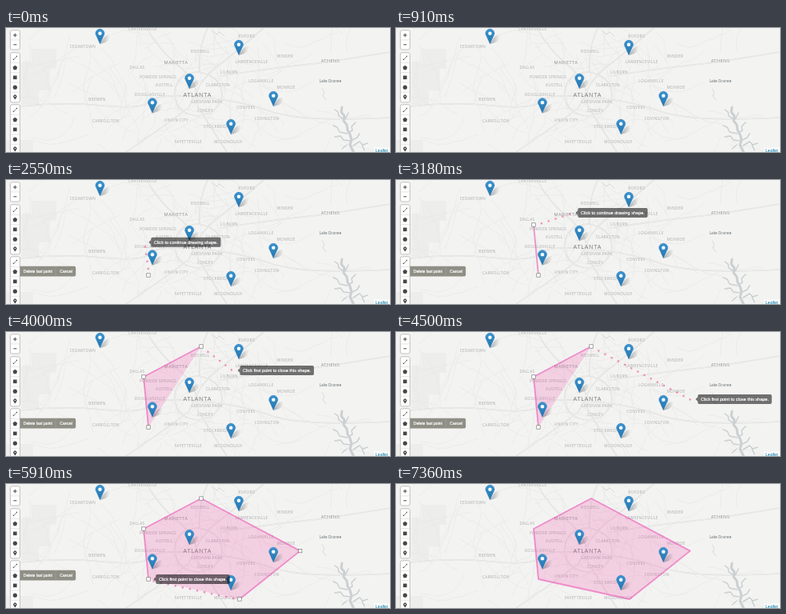
An HTML page that plays this animation: 480x155 px, repeating every 7.4 s.

```html
<!DOCTYPE html>
<html lang="en">
<head>
<meta charset="utf-8">
<title>Drawing a shape on a map</title>
<style>
  html, body { margin: 0; width: 100%; height: 100%; overflow: hidden; background: #f3f3f2; }
  svg { display: block; width: 480px; height: 155px; }
  text { font-family: "Liberation Sans", Arial, sans-serif; }
  #labels text { font-family: "Open Sans", sans-serif; text-anchor: middle; }
  #actions text, #tipText { fill: #fff; stroke: #fff; stroke-width: .2px; }
</style>
</head>
<body>
<svg id="stage" viewBox="0 0 480 155">
  <defs>
    <linearGradient id="pinFill" x1="0" y1="0" x2="0" y2="1">
      <stop offset="0" stop-color="#3a94d2"/><stop offset="1" stop-color="#2374ad"/>
    </linearGradient>
    <linearGradient id="shade"><stop offset="0" stop-opacity=".3"/><stop offset="1" stop-opacity="0"/></linearGradient>
    <g id="pin">
      <path d="M0 0L5 -8Q10 -13 12.5 -10Q13 -6 7 -2Z" fill="url(#shade)"/>
      <g transform="translate(-5.8 -19) scale(.4625)">
        <path d="M12.5 .5C5.9 .5 .5 6 .5 12.4c0 3 2 6 3.5 9L12.5 40.5 21 21.4c1.5-3 3.5-6 3.5-9C24.5 6 19 .5 12.5 .5z" fill="url(#pinFill)" stroke="#2f78b0"/>
        <circle cx="12.5" cy="12.5" r="4.8" fill="#fff"/>
      </g>
    </g>
  </defs>
  <rect width="480" height="155" fill="#f3f3f2"/>
  <path d="M19 42h13v-16h31v25h-8v27h-14v18h-22zM0 140h34v15h-34z" fill="#ededec"/>
  <g id="minor" fill="none" stroke="#e6e6e5" stroke-width=".6"></g>
  <g id="major" fill="none" stroke-linejoin="round"></g>
  <g fill="none" stroke="#cbd0d2" stroke-linejoin="round" stroke-linecap="round">
    <path d="M420 99l-1 6 4 5 -1 6 4 5 1 7 3 5 2 7 -2 6 4 8" stroke-width="3"/>
    <path d="M411 102l4 3 1 5 6 4M428 106l-4 8M409 122l5 2 3 6 9 2M437 118l-5 5 1 5 -5 3M411 136l7 -1 4 5 8 1M433 140l6 -3 3 -5M434 147l8 -5 4 4 6 -2M445 146l3 7M420 151l6 -5" stroke-width="1.5"/>
    <path d="M395 76l3 4 -2 5 4 5M258 4l5 4 4 -3 6 5" stroke-width=".7"/>
  </g>
  <g id="labels"></g>
  <path id="area" fill="#f050a8" fill-opacity=".22"/>
  <path id="outline" fill="none" stroke="#ec55b4" stroke-opacity=".6" stroke-width="1.85" stroke-linejoin="round" stroke-linecap="round"/>
  <g id="pins"></g>
  <g id="dashes" fill="#f357a1" fill-opacity=".65"></g>
  <g id="handles" fill="#fff" stroke="#666" stroke-width=".6"></g>
  <g id="bars"></g>
  <g id="actions" font-size="5.05">
    <path d="M17.4 107.7h67.8q2 0 2 2v8.7q0 2 -2 2h-67.8z" fill="#8f8f86"/>
    <path d="M62.2 107.7v12.7" stroke="#aaa" stroke-width=".5"/>
    <text x="21.8" y="115.8">Delete last point</text>
    <text x="67.3" y="115.8">Cancel</text>
  </g>
  <rect x="460" y="149.4" width="20" height="6" fill="#fff" fill-opacity=".7"/>
  <text x="462" y="155.2" font-size="5.1" fill="#0078a8">Leaflet</text>
  <g id="tip">
    <path d="M-2.8 0L0 -2.8V2.8Z" fill="#000" fill-opacity=".55"/>
    <rect id="tipBox" y="-6" height="12" rx="1.9" fill="#000" fill-opacity=".54"/>
    <text id="tipText" x="3.7" y="1.9" font-size="5.55"></text>
  </g>
</svg>
<script>
const LOOP = 7400;
const $ = id => document.getElementById(id);

function add(parent, tag, attrs, text) {
  const node = document.createElementNS("http://www.w3.org/2000/svg", tag);
  for (const key in attrs) node.setAttribute(key, attrs[key]);
  if (text) node.textContent = text;
  return parent.appendChild(node);
}

let seed = 11;
const random = () => (seed = (seed * 16807) % 2147483647) / 2147483647;

// Local roads: short wandering lines, denser around the city
for (let i = 0; i < 130; i++) {
  const inner = i < 70;
  let x = inner ? 150 + random() * 180 : random() * 480;
  let y = random() * 155;
  let angle = random() * Math.PI * 2;
  let d = `M${x} ${y}`;
  for (let step = 0; step < 7; step++) {
    angle += (random() - .5) * .8;
    x += Math.cos(angle) * (inner ? 6 : 10);
    y += Math.sin(angle) * (inner ? 6 : 10);
    d += `L${x.toFixed(1)} ${y.toFixed(1)}`;
  }
  add($("minor"), "path", { d });
}

const highways = [
  "M176 0Q192 28 212 44T237 76L240 98Q256 124 276 155",
  "M322 0Q290 28 268 45T240 76L228 100Q196 124 150 155",
  "M18 98Q70 92 120 97T180 92T238 86Q290 90 330 104T480 112",
  "M211 82Q211 57 240 55Q270 60 270 84Q266 108 240 110Q212 108 211 82Z",
  "M242 55Q240 26 252 0", "M268 60Q330 50 400 43L480 30"
];
for (const [stroke, width] of [["#d9d9d8", 1.5], ["#f5f5f4", .7]])
  for (const d of highways) add($("major"), "path", { d, stroke, "stroke-width": width });

const towns = `CEDARTOWN 96 23|CARTERSVILLE 171 1|BUFORD 301 10|ROSWELL 243 29|LAWRENCEVILLE 307 42
WINDER 349 35|DALLAS 164 49|POWDER SPRINGS 190 61|AUSTELL 198 71|LILBURN 279 55|CLARKSTON 265 71
LOGANVILLE 319 66|MONROE 350 74|DOUGLASVILLE 180 83|GRESHAM PARK 251 92|BREMEN 114 89|CONLEY 249 103
CONYERS 300 99|CARROLLTON 125 116|UNION CITY 213 115|COVINGTON 326 113|STOCKBRIDGE 265 123
FAYETTEVILLE 228 142|MCDONOUGH 278 142`;
function label(name, x, y, size, fill, spacing) {
  add($("labels"), "text", { x, y: +y + size * .36, "font-size": size, fill, "letter-spacing": spacing,
    stroke: "#f3f3f2", "stroke-width": .6, "paint-order": "stroke" }, name);
}
for (const town of towns.split(/[|\n]/)) {
  const [, name, x, y] = town.match(/(.+) (\d+) (\d+)/);
  label(name, x, y, 4.7, "#a8a9aa", .42);
}
label("MARIETTA", 212.5, 42.5, 5.6, "#8c8d8e", .45);
label("ATHENS", 405.5, 41, 5.6, "#8c8f92", .45);
label("ATLANTA", 239.3, 83, 7.3, "#747576", .75);
label("Lake Oconee", 405.5, 66.5, 4.6, "#5f676b", 0);

for (const [x, y] of [[117.5, 20], [291, 34], [229.3, 76], [183, 106.4], [334.3, 98], [281.2, 133]])
  add($("pins"), "use", { href: "#pin", x, y });

const PITCH = 12.3;
const icons = [
  "M-2.6 1.6h1.2L1.5 -1.3V-2.5H2.7V-1.3H2.1L-1.2 2V2.8H-2.6Z",
  "M0 -2.8L2.8 -.7 1.8 2.6H-1.8L-2.8 -.7Z",
  "M-2.3 -2.3H2.3V2.3H-2.3Z",
  "M-2.6 0a2.6 2.6 0 1 0 5.2 0a2.6 2.6 0 1 0 -5.2 0Z",
  "M0 3.1L-1.9 .3A2.2 2.2 0 1 1 1.9 .3ZM-.8 -.9a.8 .8 0 1 0 1.6 0a.8 .8 0 1 0 -1.6 0Z"
];
const zoomIcons = ["M-2.3 -.5H-.5V-2.3H.5V-.5H2.3V.5H.5V2.3H-.5V.5H-2.3Z", "M-2 -.5H2V.5H-2Z"];
function toolbar(top, paths, pitch) {
  add($("bars"), "rect", { x: 5.4, y: top, width: 12, height: paths.length * pitch + .6, rx: 2,
    fill: "#fff", stroke: "#b9b9b8", "stroke-width": .9 });
  paths.forEach((d, i) => {
    const y = top + .3 + pitch * (i + .5);
    if (i) add($("bars"), "path", { d: `M5.9 ${y - pitch / 2}h11`, stroke: "#ccc", "stroke-width": .5 });
    add($("bars"), "path", { d, transform: `translate(11.3 ${y})`, fill: "#464646", "fill-rule": "evenodd" });
  });
}
toolbar(2.8, zoomIcons, 11.8);
toolbar(30.8, icons, PITCH);
toolbar(95.8, icons, PITCH);

// Pointer waypoints: time, x, y
const pointer = [
  [1480, 11, 113], [1680, 134.8, 110], [1950, 178, 119],
  [2330, 178, 119], [2550, 172, 78], [2720, 172, 56],
  [2960, 172, 56], [3180, 218, 41], [3420, 244, 18],
  [3810, 244, 18], [4000, 283, 48], [4450, 368, 84],
  [4760, 368, 84], [4980, 292, 144],
  [5450, 292, 144], [5850, 178, 119]
];
const corners = [[178, 119], [172, 56], [244, 18], [367.7, 83.6], [292, 144]];
const clicks = [2240, 2840, 3770, 4730, 5300];
const ACTIVATE = 1250, TIP_START = 1500, FINISH = 6000;
const DASH_GAP = 9.25;

const handles = corners.map(([x, y]) =>
  add($("handles"), "rect", { x: x - 2.2, y: y - 2.2, width: 4.4, height: 4.4 }));
const dashes = Array.from({ length: 20 }, () => add($("dashes"), "rect", { width: 2.3, height: 2.3 }));
const show = (node, on) => node.setAttribute("visibility", on ? "visible" : "hidden");

function pointerAt(t) {
  const next = pointer.findIndex(p => p[0] > t);
  if (next < 0) return pointer[pointer.length - 1].slice(1);
  if (next === 0) return pointer[0].slice(1);
  const [a, b] = [pointer[next - 1], pointer[next]];
  const k = (t - a[0]) / (b[0] - a[0]);
  return [a[1] + (b[1] - a[1]) * k, a[2] + (b[2] - a[2]) * k];
}

function hint(count) {
  if (!count) return "Click to start drawing shape.";
  return count < 3 ? "Click to continue drawing shape." : "Click first point to close this shape.";
}

function render(t) {
  const done = t >= FINISH;
  const count = clicks.filter(c => t >= c).length;
  const [x, y] = pointerAt(t);

  const line = count ? "M" + corners.slice(0, count).join("L") : "";
  $("area").setAttribute("d", line);
  $("outline").setAttribute("d", line + (done ? "Z" : ""));
  handles.forEach((h, i) => show(h, !done && i < count));
  show($("actions"), t >= ACTIVATE && !done);

  const [fromX, fromY] = corners[Math.max(0, count - 1)];
  const length = Math.hypot(x - fromX, y - fromY);
  dashes.forEach((dash, i) => {
    const along = (i + 1) * DASH_GAP;
    const visible = count > 0 && !done && along < length;
    show(dash, visible);
    if (!visible) return;
    dash.setAttribute("x", fromX + (x - fromX) * along / length);
    dash.setAttribute("y", fromY + (y - fromY) * along / length);
  });

  show($("tip"), t >= TIP_START && !done);
  const text = hint(count);
  if ($("tipText").textContent !== text) {
    $("tipText").textContent = text;
    $("tipBox").setAttribute("width", $("tipText").getComputedTextLength() + 7.4);
  }
  $("tip").setAttribute("transform", `translate(${x + 9.2} ${y})`);
}

const start = performance.now();
function tick() {
  render((performance.now() - start) % LOOP);
  requestAnimationFrame(tick);
}
tick();
</script>
</body>
</html>
```
